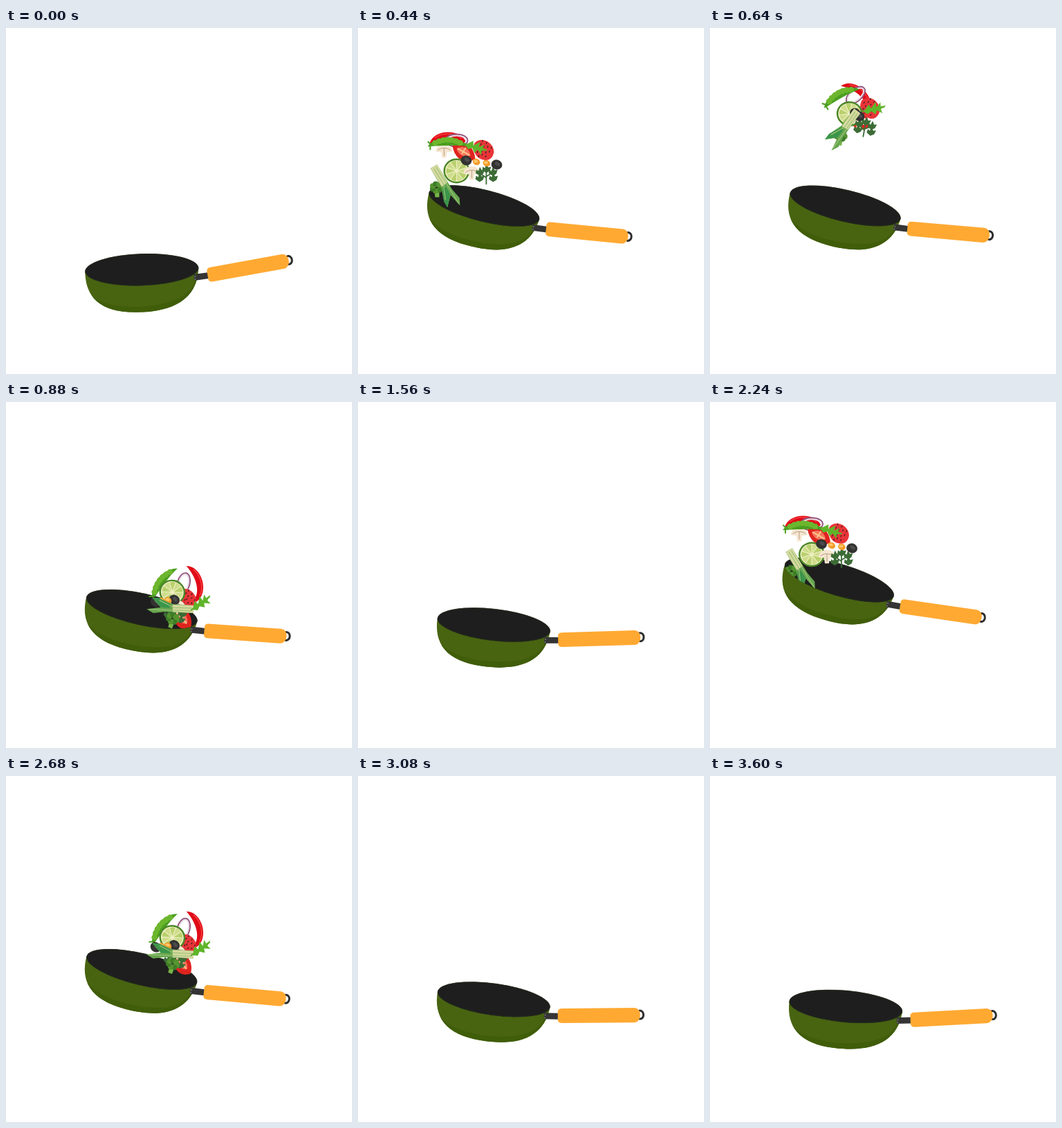
An HTML page with a canvas that plays this animation: 500 by 500 pixels, repeating every 3.68 s.

```html
<!DOCTYPE html>
<html lang="en">
<head>
<meta charset="utf-8">
<title>Tossing vegetables</title>
<style>
  html, body { margin: 0; width: 100%; height: 100%; overflow: hidden; background: #fff; }
  canvas { display: block; width: 500px; height: 500px; }
</style>
</head>
<body>
<canvas id="stage" width="500" height="500"></canvas>
<script>
const ctx = document.getElementById('stage').getContext('2d');
const LOOP = 3680, STEP = 40, TOSS = 1860, TAU = Math.PI * 2, RAD = Math.PI / 180;
const RIM = -1.7 * RAD;

const mix = (a, b, u) => a + (b - a) * u;
const ramp = (t, from, to) => Math.min(1, Math.max(0, (t - from) / (to - from)));
const smooth = (t, from, to) => { const u = ramp(t, from, to); return u * u * (3 - 2 * u); };
const settle = (t, from, to) => 1 - (1 - ramp(t, from, to)) ** 2;
const pulse = (t, center, width) => Math.exp(-(((t - center) / width) ** 2));

// Dip, two-stage lift, catch, then a slow sink back to rest.
function panPose(t) {
  const dip = smooth(t, -300, -120);
  return {
    x: 196.3 - 14 * pulse(t, 450, 110),
    y: 322 + 49 * dip - 23 * smooth(t, -120, 20) - 91 * smooth(t, 80, 390)
      + 52 * smooth(t, 720, 940) + 24 * settle(t, 940, 1740),
    tilt: RAD * (8.3 - 10.9 * dip + 17.7 * smooth(t, -120, 400)
      + 3.4 * pulse(t, 370, 50) - 8.2 * settle(t, 820, 1740))
  };
}

// The food rides up with the pan, then flies along a rounded peak.
function foodPose(t, pan) {
  const flight = 82.5 + Math.hypot(0.7 * (t - 600), 30);
  const ride = pan.y + 75 - 120 * smooth(t, 230, 375);
  return {
    x: pan.x - 32 + 84 * smooth(t, 480, 780),
    y: t < 600 ? Math.min(flight, ride) : flight
  };
}

function fill(path, color) {
  ctx.fillStyle = color;
  ctx.fill(new Path2D(path));
}
function line(path, color, width) {
  ctx.strokeStyle = color;
  ctx.lineWidth = width;
  ctx.stroke(new Path2D(path));
}
function oval(x, y, rx, ry, color, turn = 0) {
  ctx.fillStyle = color;
  ctx.beginPath();
  ctx.ellipse(x, y, rx, ry, turn, 0, TAU);
  ctx.fill();
}
function ring(x, y, rx, ry, color, width, turn = 0) {
  ctx.strokeStyle = color;
  ctx.lineWidth = width;
  ctx.beginPath();
  ctx.ellipse(x, y, rx, ry, turn, 0, TAU);
  ctx.stroke();
}

function chili() {
  fill('M-27 9C-22-13 20-14 27 9L23 11C14-2-10 0-27 9Z', '#e00a18');
  line('M-19 0C-8-8 10-7 19 1', '#f5403c', 1.5);
}
function onion() {
  ring(0, 0, 16, 9, '#93577f', 2);
  ring(0, 0, 14, 7, '#eadfe8', 2);
}
function mushroom() {
  fill('M-12 2C-12-12 12-12 12 2L4 3L3 11L-3 11L-4 3Z', '#f5e6d0');
  line('M-9 0C-4-4 4-4 9 0M0-2V8', '#b69b82', 1);
}
function tomato() {
  fill('M-16-8C-4-19 15-11 17 10C6 20-12 14-16-8Z', '#df241f');
  fill('M-10-4C-2-10 9-5 10 6C2 9-7 6-10-4Z', '#f7735b');
  line('M-8-4L8 5M-2 3L3-5', '#f9c68b', 2);
}
function strawberry() {
  fill('M-13-9C-5-19 14-12 15 3C14 13 7 17 0 15C-12 13-17-1-13-9Z', '#e93437');
  for (let i = 0; i < 16; i++) {
    const a = i * 2.4, r = 3.2 * Math.sqrt(i);
    oval(r * Math.cos(a), r * Math.sin(a), 0.8, 1.6, '#512126', 0.4);
  }
}
function lime() {
  oval(0, 0, 19, 18, '#4c8627');
  oval(0, 0, 16.5, 15.5, '#eef0c4');
  for (let i = 0; i < 10; i++) {
    ctx.save();
    ctx.rotate(i * TAU / 10);
    fill('M2 0L14-4Q16 0 14 4Z', i % 2 ? '#b9d06c' : '#cfdc8c');
    ctx.restore();
  }
}
function peas() {
  fill('M-29 6C-18-9 13-14 29 6C13 3-13 5-29 6Z', '#4b9e20');
  for (let i = -3; i < 4; i++) oval(i * 6, i * i * 0.5 - 4, 4.2, 4, '#6cb62e');
  line('M-24 3L-28-1M-25 5L-25 10', '#4b9e20', 2);
}
function olive() {
  oval(0, 0, 8, 7, '#323231', 0.3);
  oval(1, -1, 4, 2.5, '#4c4c4d', 0.5);
}
function carrot() {
  oval(0, 0, 5.5, 4.5, '#f39b29', 0.5);
  oval(-1, -1, 3, 2, '#ffc76b');
}
function parsley() {
  line('M0 13L0-5M0 4L-10-3M0 2L10-4', '#3c6c36', 1.8);
  for (let i = 0; i < 5; i++) {
    const a = Math.PI * (0.85 + i * 0.325);
    fill(`M${11 * Math.cos(a)} ${9 * Math.sin(a) + 6}l-6-4l1-5l3 2l2-6l3 5l4-1l-2 6Z`, '#3c6c36');
  }
}
function broccoli() {
  fill('M-3 0L4 0L4 12L-2 12Z', '#78b548');
  for (let i = 0; i < 7; i++) {
    oval(6 * Math.cos(i * 0.9), 5 * Math.sin(i * 0.9) - 2, 4, 4, i % 2 ? '#3e7d27' : '#56942f');
  }
}
function leek() {
  ctx.rotate(-120 * RAD);
  fill('M33-6L33 5L-9 6L-25 9L-35 4L-15 0L-28-13L-18-13L2-6Z', '#68a650');
  fill('M2-5L33-6L33 5L3 5Z', '#d6d9a0');
  fill('M-28-13L-18-13L0-5L-2 0L-14 0Z', '#3b954a');
  line('M-31 4L30 2M-17-10L4-1L30-2', '#9cc274', 1.2);
}
function arugula() {
  ctx.rotate(25 * RAD);
  line('M-17 3L15-1', '#4fa726', 1.8);
  fill('M-15 4L-7-6L-4 0L3-9L4-1L10-8L10-2L18-3L10 2L12 8L4 3L2 9L-4 4L-9 8Z', '#5fb52a');
}

// A piece goes from its rising spot to its falling spot while spinning.
const piece = (draw, rise, fall, spin = 20) => ({ draw, rise, fall, spin });
const bits = [olive, carrot, carrot, olive].map((draw, i) =>
  piece(draw, [6 + 14.7 * i, 2 * i - 7], [-5 - 9 * i, 5 + i]));
const pieces = [
  piece(chili, [-20, -40], [28, -20], 75),
  piece(onion, [-8, -36], [8, -18], -75),
  piece(mushroom, [-26, -22], [0, 10]),
  piece(tomato, [2, -20], [6, 31]),
  piece(strawberry, [31, -23], [13, 4]),
  piece(peas, [-21, -33], [-23, -21], -52),
  piece(lime, [-8, 8], [-8, -6]),
  piece(mushroom, [14, 10], [0, 14]),
  piece(parsley, [35, 14], [-4, 26]),
  ...bits,
  piece(broccoli, [-37, 34], [-8, 34]),
  piece(leek, [-24, 30], [-10, 17], 124),
  piece(arugula, [20, -27], [33, 9], -53)
];

function drawFood(t, pan) {
  const { x, y } = foodPose(t, pan);
  const blend = smooth(t, 440, 820);
  ctx.translate(x, y);
  for (const { draw, rise, fall, spin } of pieces) {
    ctx.save();
    ctx.translate(mix(rise[0], fall[0], blend), mix(rise[1], fall[1], blend));
    ctx.rotate(spin * blend * RAD);
    draw();
    ctx.restore();
  }
}

function drawHandle() {
  fill('M75 7L97 4V13L76 16Z', '#343434');
  oval(77, 10, 1, 1, '#777');
  oval(77, 14, 1, 1, '#777');
  ring(212, -13, 5, 6, '#2e2e2e', 3, -0.2);
  fill('M98-3L202-21.5Q208-22 211-17Q215-8 209-2Q207-1 205-.5L102 17.5Q97 18 96 14L94 2Q94-2 98-3Z', '#ffa932');
}

function drawPan() {
  const body = new Path2D('M-82 2C-82 39-61 61.5-9 61.5C45 61.5 80 43 82-2Z');
  ctx.fillStyle = '#486411';
  ctx.fill(body);
  ctx.save();
  ctx.clip(body);
  fill('M-78 33C-55 58 2 57 38 47C60 41 76 28 78 10L90 70H-85Z', '#405d0a');
  ctx.restore();
  oval(0, 0, 82, 23, '#1e1e1e', RIM);
  ring(0, 0, 81.7, 22.7, '#26301c', 0.8, RIM);
  drawHandle();
}

// The front lip hides whatever is inside the pan.
function clipAboveLip() {
  ctx.beginPath();
  ctx.moveTo(-400, -500);
  ctx.lineTo(400, -500);
  ctx.lineTo(82, -2);
  ctx.ellipse(0, 0, 82, 23, RIM, 0, Math.PI);
  ctx.closePath();
  ctx.clip();
}

function drawScene(t) {
  const pan = panPose(t);
  ctx.save();
  ctx.translate(pan.x, pan.y);
  ctx.rotate(pan.tilt);
  drawPan();
  if (t > 230 && t < 1130) {
    clipAboveLip();
    ctx.rotate(-pan.tilt);
    ctx.translate(-pan.x, -pan.y);
    drawFood(t, pan);
  }
  ctx.restore();
}

function frame() {
  const time = Math.min(3600, Math.floor(performance.now() % LOOP / STEP) * STEP);
  // The first toss rests for a moment before the second one begins.
  const phase = time < 1560 ? Math.min(time, 1360) : time - TOSS;
  ctx.fillStyle = '#fff';
  ctx.fillRect(0, 0, 500, 500);
  ctx.lineCap = ctx.lineJoin = 'round';
  drawScene(phase);
  requestAnimationFrame(frame);
}
frame();
</script>
</body>
</html>
```
